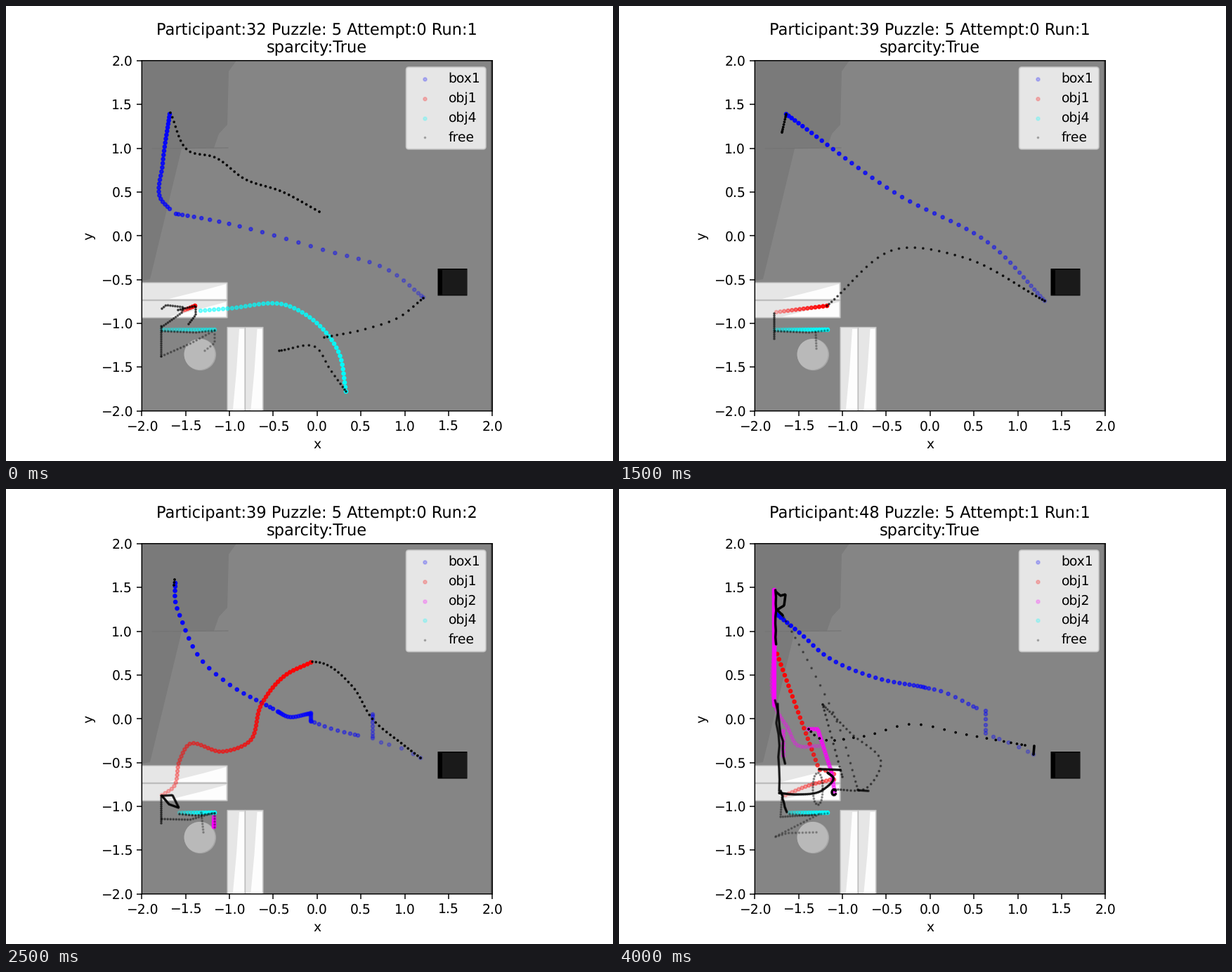
A matplotlib script that plays this animation: 864 px wide and 648 px high, repeating every 4500 ms.

```python
import numpy as np
import matplotlib.pyplot as plt
from functools import partial
from matplotlib.animation import FuncAnimation
from matplotlib.patches import Circle, Polygon

plt.rcParams.update({"path.snap": False, "text.hinting": "none"})

W, H, DPI = 864, 648, 135
UNIT = H * 0.77 / 4            # pixels per data unit
CX, CY = W * 0.5125, H * 0.505  # pixel position of the data origin
FAINT = 0.22                   # opacity of the earliest dot of each kind

COLORS = {"box1": "blue", "obj1": "red", "obj2": "magenta",
          "obj4": "cyan", "free": "black"}

fig, ax = plt.subplots(figsize=(W / DPI, H / DPI), dpi=DPI)
dots = {}


def to_data(pts):
    """Stage pixels to axis units."""
    return (np.asarray(pts, float) - (CX, CY)) / (UNIT, -UNIT)


def curve(pts, bend):
    """Dense cubic through the key points; bend 0 gives straight legs."""
    p = np.array(pts, float)
    t = np.r_[0, np.cumsum(np.hypot(*np.diff(p, axis=0).T))]
    slope = bend * np.gradient(p, t, axis=0)
    u = np.linspace(0, t[-1], 600)
    i = np.clip(np.searchsorted(t, u, "right") - 1, 0, len(p) - 2)
    h = (t[i + 1] - t[i])[:, None]
    s = (u - t[i])[:, None] / h
    return (p[i] * (1 + 2 * s) * (1 - s) ** 2 + slope[i] * h * s * (1 - s) ** 2
            + p[i + 1] * s * s * (3 - 2 * s) + slope[i + 1] * h * s * s * (s - 1))


def trail(kind, *pts, step=5.5, ease=0.0, bend=1):
    """Dots along a path, closer together where the hand starts and stops."""
    path = curve(pts, bend)
    length = np.r_[0, np.cumsum(np.hypot(*np.diff(path, axis=0).T))]
    t = np.linspace(0, 1, max(2, round(length[-1] / step) + 1))
    t = (1 - ease) * t + ease * t * t * (3 - 2 * t)
    xy = [np.interp(t * length[-1], length, c) for c in path.T]
    dots.setdefault(kind, []).append(np.transpose(xy))


box = partial(trail, "box1", step=10, ease=.6)
obj1 = partial(trail, "obj1")
obj2 = partial(trail, "obj2")
obj4 = partial(trail, "obj4")
reach = partial(trail, "free", step=9, ease=.6)
free = partial(trail, "free", step=3.5, bend=0)


def loop(x, y, rx, ry, step, start=0, turn=1):
    a = 2 * np.pi * (start + turn * np.linspace(0, 1, 13))
    reach(*zip(x + rx * np.cos(a), y + ry * np.sin(a)), step=step, ease=0)


def wall(y0, y1, x=221):
    free((x, y0), (x, y1), step=3)


def slide(x0, y=461):
    """Move the flat piece to the right and the hand back along it."""
    obj4((x0, y), (297, y), step=4)
    free((297, y + 1), (270, y + 4), (x0, y + 2), step=4.5)


def shake(rng, x0, y0, x1, y1, spread):
    """A nervous line from one point to another."""
    t = np.linspace(0, 1, 9)
    x = x0 + (x1 - x0) * t + rng.uniform(-spread, spread, t.size)
    free(*zip(x, y0 + (y1 - y0) * t), step=2)


def run_a(rng):
    free((283, 491), (297, 480), (297, 462), (262, 481), (221, 499), step=5)
    slide(222)
    wall(499, 456)
    free((222, 457), (250, 437), (253, 429), (228, 426), (222, 431))
    free((260, 453), (270, 440), (270, 427), (245, 433))
    obj4((277, 434), (315, 431), (402, 427), (437, 447), (473, 492), (484, 549), step=6.5)
    obj1((252, 434), (269, 427), step=4)
    reach((484, 549), (461, 517), (441, 486), (389, 491), step=7)
    reach((453, 472), (512, 460), (560, 443), (594, 416))
    box((594, 415), (551, 380), (447, 346), (283, 303), (242, 296), step=13, ease=.8)
    box((233, 289), (221, 276), (223, 225), (233, 154), step=5.5, ease=.2)
    reach((234, 152), (261, 207), (296, 215), (341, 247), (392, 264), (446, 293),
          step=7, ease=0)


def run_b(rng):
    free((280, 489), (250, 503), (221, 509), step=5)
    slide(222)
    wall(478, 440)
    obj2((297, 466), (296, 480), step=2)
    obj1((226, 437), (298, 427))
    reach((298, 428), (394, 362), (520, 374), (592, 398))
    box((592, 398), (518, 352), (366, 280), (229, 164))
    reach((229, 164), (221, 190), step=3)


def run_c(rng):
    free((280, 489), (275, 481), (240, 480), (221, 473), (221, 461))
    slide(222, 462)
    reach((297, 462), (258, 472), (244, 471), (242, 460), (250, 451), step=3.5)
    obj4((250, 451), (297, 452), step=3)
    reach((297, 452), (272, 450), (255, 437), (228, 437), step=4)
    obj1((226, 440), (240, 433), (295, 429), step=7)
    free((228, 437), (240, 433), (295, 430), step=6)
    wall(441, 430)
    reach((221, 430), (229, 375), (269, 323), (334, 289), (408, 298), (454, 346),
          (540, 371), step=10, ease=.7)
    reach((540, 371), (556, 389), (590, 386), step=3, ease=0)
    box((590, 386), (544, 342), (436, 270), (375, 217), (300, 174), (253, 137), (224, 126),
        step=11, ease=.7)
    reach((224, 126), (221, 140), (221, 163), step=2.6)


def run_d(rng):
    free((281, 488), (280, 465), step=4)
    slide(222)
    wall(474, 438)
    obj1((224, 436), (296, 427))
    reach((296, 427), (396, 346), (490, 358), (606, 420))
    box((606, 420), (532, 342), (396, 268), (238, 154))
    reach((238, 154), (232, 180), step=3)


def run_e(rng):
    free((280, 489), (232, 507), (221, 518), (290, 514), step=5)
    free((292, 503), (290, 468), step=4)
    slide(228)
    wall(470, 452)
    free((297, 478), (297, 464), (222, 466), step=4)
    reach((246, 481), (262, 465), (297, 463), (256, 453), (246, 435), step=4)
    obj1((247, 436), (256, 429), (288, 428), step=3)
    free((288, 428), (222, 436), (221, 420), step=5)
    obj1((222, 419), (293, 410), (305, 402), step=4)
    reach((305, 403), (261, 380), (245, 335), (291, 290), (382, 291), (470, 315), (537, 358),
          (580, 420), step=10)
    reach((551, 393), (562, 409), (581, 422), step=3)
    reach((580, 422), (585, 445), (598, 435), (626, 430), step=3.5)
    loop(558, 456, 30, 13, 13)
    loop(603, 448, 19, 19, 5, .9, .62)
    loop(636, 460, 29, 9, 14, -.4, .85)
    free((587, 457), (619, 457), step=4)
    box((622, 428), (599, 380), (552, 315), (494, 265), (409, 232), (321, 208), (246, 187),
        ease=.5)
    reach((243, 187), (270, 220), (291, 249), step=8)
    free((293, 250), (313, 250))


def run_f(rng):
    free((281, 489), (278, 461), step=4)
    obj2((296, 465), (296, 481), step=2)
    free((297, 482), (297, 461), (262, 471), (222, 470), step=4)
    slide(247)
    wall(476, 437)
    free((222, 437), (237, 436), (246, 454), (232, 449), (222, 437), step=2)
    obj1((222, 436), (238, 425), (247, 387), (260, 364), (308, 374), (347, 359), (363, 308),
         (398, 265), (434, 247))
    reach((436, 246), (446, 247), (493, 281), (522, 328), (564, 363), (590, 383), step=6.5,
          ease=.2)
    box((590, 383), (567, 371), (534, 361), step=16)
    box((522, 355), (522, 321), step=4)
    box((501, 351), (465, 342), (435, 331), step=8)
    box((434, 331), (434, 319), step=2)
    box((432, 320), (400, 324), (387, 317), step=3)
    box((380, 313), (316, 277), (277, 242), (250, 187), (241, 160), (241, 134), step=10)
    free((240, 129), (239, 137))


def run_g(rng):
    reach((254, 544), (290, 520), (285, 495), step=8)
    free((257, 541), (270, 518), step=6)
    free((297, 491), (264, 502), (265, 474), (270, 462))
    free((280, 489), (281, 489))
    slide(222)
    free((270, 466), (258, 478), (221, 485), step=5)
    wall(485, 461)
    free((227, 436), (223, 443), (234, 457), (262, 445), (277, 437), step=2.5)
    obj1((228, 436), (252, 426), (260, 412), (266, 378), (276, 345), (312, 313), (362, 286),
         (432, 272), (499, 267), step=6)
    reach((499, 267), (478, 327), (486, 357), (523, 395), (588, 436), step=11, ease=.3)
    reach((588, 437), (625, 439), (627, 430), step=6, ease=0)
    box((628, 430), (531, 423), (476, 411), (411, 377), (355, 340), (299, 295), (291, 231),
        (288, 178), step=9.5, ease=.3)
    free((288, 178), (291, 193), step=2)
    reach((292, 202), (311, 278), (327, 320), (344, 340), step=9)


def run_h(rng):
    free((280, 489), (250, 507), (224, 513), step=5)
    slide(222)
    wall(476, 437)
    obj2((221, 170), (221, 250), step=3)
    obj1((226, 436), (260, 368), (370, 306), (446, 268))
    reach((446, 268), (534, 344), (590, 390))
    box((590, 390), (466, 330), (310, 226), (232, 168))
    reach((232, 168), (221, 190), step=3)


def run_i(rng):
    free((281, 489), (240, 490), (221, 496), (285, 463), step=5)
    slide(243)
    free((278, 464), (230, 467), (232, 436))
    loop(283, 427, 7, 23, 4)
    obj1((237, 436), (265, 424), (305, 413), step=5)
    obj1((306, 414), (306, 402), (285, 400), (255, 318), (225, 235), bend=0, step=8)
    obj2((284, 366), (254, 365), (240, 340), (226, 318), (222, 205), step=5)
    obj2((234, 345), (234, 380))
    obj2((307, 433), (303, 405), (283, 342), (270, 342), bend=0, step=4)
    obj2((221, 308), (221, 144), step=2.5)
    reach((232, 178), (273, 253), (314, 341), (340, 428), step=11)
    reach((290, 307), (329, 347), (373, 390), (352, 426), (306, 428), step=6)
    reach((290, 307), (318, 410), step=7)
    free((340, 429), (355, 430), step=2)
    shake(rng, 223, 301, 230, 430, 2.5)
    shake(rng, 226, 306, 236, 391, 2)
    shake(rng, 230, 430, 239, 460, 1)
    reach((228, 433), (252, 435), (291, 428), (305, 411), (297, 404), step=2)
    free((285, 399), (315, 400), step=2)
    loop(306, 432, 3, 4, 2, .1, .8)
    shake(rng, 223, 144, 224, 221, 1.5)
    free((224, 147), (230, 152), (237, 150), (235, 166), (225, 172), (233, 180), step=2)
    box((590, 378), (559, 363), (533, 353), step=12)
    box((522, 348), (522, 316), step=6)
    box((509, 312), (455, 287), (436, 283), step=9)
    box((433, 282), (366, 269), (288, 233), (263, 210), (224, 178), step=8)
    free((590, 378), (591, 366), step=2)
    reach((578, 365), (490, 349), (416, 335), (343, 353), (280, 352), (270, 342), step=13,
          ease=.7)


# participant, attempt, run, trails
RUNS = [(32, 0, 1, run_a), (34, 0, 1, run_b), (34, 0, 2, run_c),
        (39, 0, 1, run_d), (39, 1, 1, run_e), (39, 0, 2, run_f),
        (41, 0, 1, run_g), (41, 0, 2, run_h), (48, 1, 1, run_i)]


def poly(color, *pts, edge="none"):
    ax.add_patch(Polygon(to_data(pts), fc=color, ec=edge, lw=.7, zorder=0))


def rect(color, x0, y0, x1, y1, edge="none"):
    poly(color, (x0, y0), (x1, y0), (x1, y1), (x0, y1), edge=edge)


def line(color, *pts):
    ax.plot(*to_data(pts).T, color=color, lw=.6, zorder=0)


def disc(color, x, y, r):
    ax.add_patch(Circle(to_data((x, y)), r / UNIT, fc=color, ec="none", zorder=0))


def room():
    rect("#858585", 190, 70, 700, 585)
    poly("#7a7a7a", (190, 70), (327, 70), (327, 79), (317, 93), (315, 169), (303, 182),
         (296, 202), (250, 203), (205, 389), (190, 392))
    line("#747474", (208, 203), (316, 202))
    for y in (394, 419.5):
        rect("#e6e6e6", 185, y, 315, y + 24.5, edge="#bdbdbd")
        poly("#fdfdfd", (232, y + 23), (280, y + 11), (313, y + 2), (313, y + 23))
    for x in (315, 340.5):
        rect("#e6e6e6", x, 457.5, x + 25.5, 585, edge="#bdbdbd")
        poly("#fdfdfd", (x + 17, 460), (x + 24, 460), (x + 24, 585), (x + 7, 585),
             (x + 13, 520))
    disc("#a6a6a6", 276.5, 496.5, 22.6)
    disc("#b9b9b9", 275.5, 496, 22)
    rect("#000000", 614.5, 374, 656.5, 412.5)
    rect("#1a1a1a", 621, 375.5, 656, 411.5)
    line("#3c3c3c", (691, 78), (691, 577))


def draw_dots():
    """Every kind grows from faint to solid over its own time."""
    for kind, color in COLORS.items():
        if kind in dots:
            xy = to_data(np.concatenate(dots[kind]))
            size = 1 if kind == "free" else 6.25
            ax.scatter(*xy.T, s=size, color=color, linewidths=1,
                       alpha=np.linspace(FAINT, 1, len(xy)))
            ax.scatter([], [], s=size, color=color, alpha=FAINT, linewidths=1, label=kind)


def draw(frame):
    person, attempt, run, plot_run = RUNS[frame]
    ax.clear()
    dots.clear()
    room()
    plot_run(np.random.default_rng(frame))
    draw_dots()
    ticks = np.arange(-2, 2.1, .5)
    ax.set(xlim=(-2, 2), ylim=(-2, 2), aspect="equal", xlabel="x", ylabel="y",
           xticks=ticks, yticks=ticks)
    ax.set_title(f"Participant:{person} Puzzle: 5 Attempt:{attempt} Run:{run}\n"
                 "sparcity:True")
    ax.legend(loc="upper right")


anim = FuncAnimation(fig, draw, frames=len(RUNS), init_func=lambda: None,
                     interval=500, repeat=True, repeat_delay=0)
plt.show()
```
